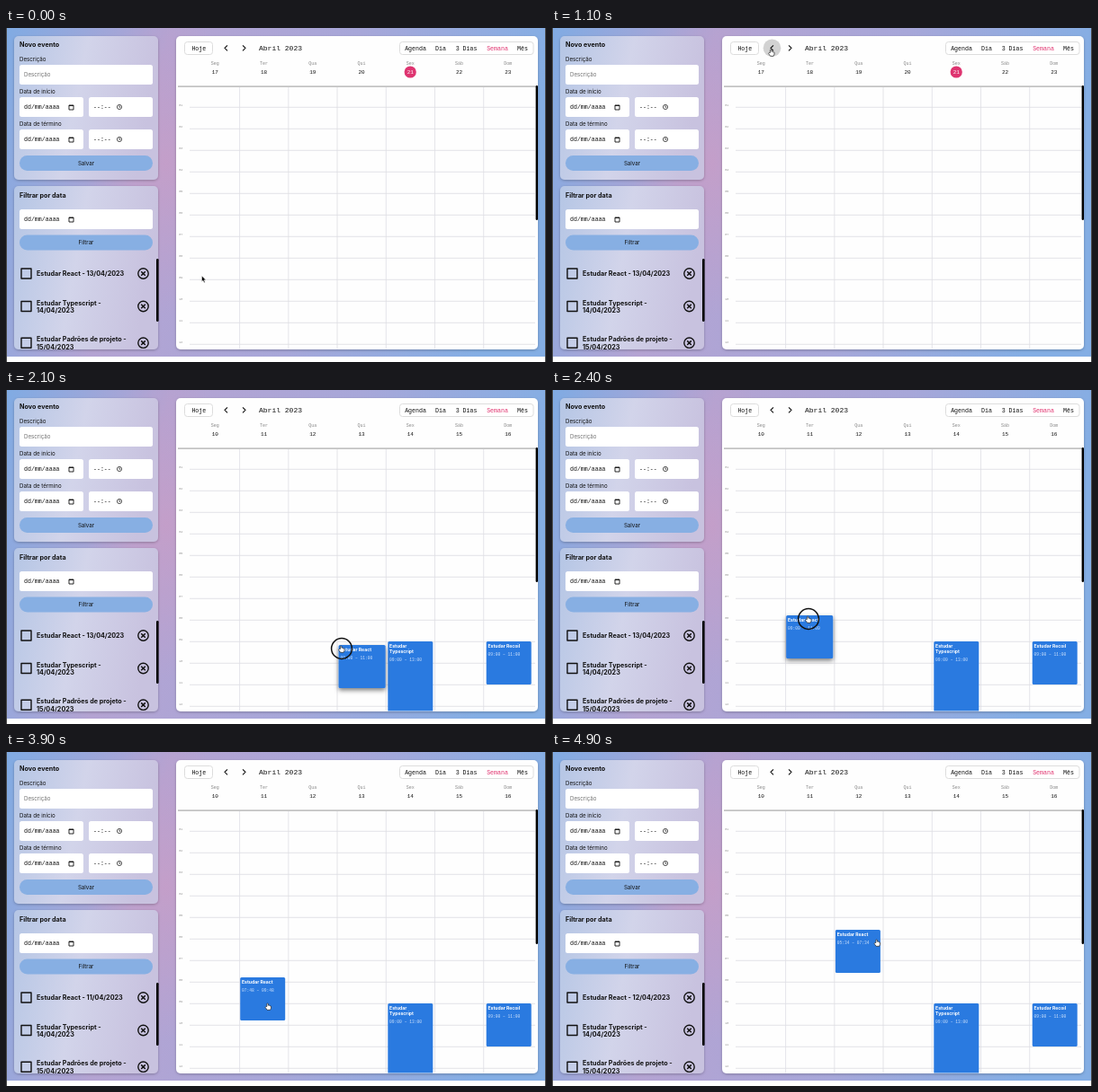
Recreate the animation shown at these times as an HTML page. Size 600x372 px, loop 5000 ms.

```html
<!DOCTYPE html>
<html lang="pt">
<head>
<meta charset="utf-8">
<style>
html, body { margin: 0; width: 100%; height: 100%; overflow: hidden; background: #fff }
svg { display: block; width: 600px; height: 372px }
text { font: 6.2px Inter, sans-serif; fill: #111; white-space: pre }
.b { font-weight: 700; font-size: 7.2px }
.m { font: 6.6px "Liberation Mono", "Courier New", monospace }
.mid { text-anchor: middle }
.day { font-size: 5px; fill: #888 }
.num { font-size: 6px }
.hour { font-size: 3.2px; fill: #888 }
.title { font-size: 5.1px; font-weight: 700; fill: #fff }
.time { font-size: 4.6px; fill: #cfe2fb }
.line { fill: none; stroke: #111 }
</style>
</head>
<body>
<svg id="stage" viewBox="0 0 600 372">
  <defs>
    <linearGradient id="sky" x2="1" y2=".15">
      <stop stop-color="#80abe3"/><stop offset=".3" stop-color="#b4a3d2"/>
      <stop offset=".65" stop-color="#a7a7d9"/><stop offset="1" stop-color="#84aee4"/>
    </linearGradient>
    <radialGradient id="pink">
      <stop stop-color="#c99dc6" stop-opacity=".75"/><stop offset="1" stop-color="#c99dc6" stop-opacity="0"/>
    </radialGradient>
    <linearGradient id="glass" x2="1" y2=".2">
      <stop stop-color="#b5c6e5"/><stop offset=".5" stop-color="#d2d4ea"/><stop offset="1" stop-color="#c8c2df"/>
    </linearGradient>
    <filter id="soft" x="-20%" y="-20%" width="140%" height="150%">
      <feDropShadow dx="0" dy="1" stdDeviation="1.5" flood-opacity=".25"/>
    </filter>
    <filter id="lift" x="-20%" y="-20%" width="140%" height="150%">
      <feDropShadow dx="0" dy="2.5" stdDeviation="2.5" flood-opacity=".5"/>
    </filter>
    <clipPath id="list"><rect x="9" y="257" width="160" height="101"/></clipPath>
    <clipPath id="grid"><rect x="189" y="66" width="400" height="291.5"/></clipPath>
  </defs>
</svg>
<script>
const stage = document.getElementById('stage');
const $ = id => document.getElementById(id);
const times = (n, f) => Array.from({length: n}, (_, i) => f(i)).join('');
const rect = (x, y, w, h, fill, r = 0, more = '') =>
  `<rect x="${x}" y="${y}" width="${w}" height="${h}" rx="${r}" fill="${fill}" ${more}/>`;
const text = (x, y, str, cls = '', more = '') => `<text x="${x}" y="${y}" class="${cls}" ${more}>${str}</text>`;
const path = (d, more = '') => `<path d="${d}" class="line" ${more}/>`;

const dateBox = (y, w = 71) => rect(15, y, w, 22, '#fff', 2.5) + text(20, y + 13.2, 'dd/mm/aaaa', 'm') +
  path(`M70 ${y + 9}h5v5h-5zM70 ${y + 9.5}h5`, 'stroke-width=".9"');
const timeBox = y => rect(92, y, 71, 22, '#fff', 2.5) + text(97, y + 13.2, '--:--', 'm') +
  path(`M123.4 ${y + 11}a2.6 2.6 0 1 0 5.2 0a2.6 2.6 0 1 0 -5.2 0M126 ${y + 9.3}v1.9h1.3`, 'stroke-width=".7"');
const button = (y, label) => rect(15, y, 148, 17, '#87afe3', 8.5) + text(89, y + 10.6, label, 'mid');
const task = (y, first, second) =>
  path(`M17 ${y - 5.5}h11v11h-11z`, 'stroke-width="1.4" stroke-linejoin="round"') +
  `<circle cx="152.5" cy="${y}" r="5.7" class="line" stroke-width="1.4"/>` +
  path(`M150.2 ${y - 2.3}l4.6 4.6m0 -4.6l-4.6 4.6`, 'stroke-width="1.5"') +
  (second ? text(34, y - 1.5, first, 'b') + text(34, y + 7.2, second, 'b') : text(34, y + 2.6, first, 'b', 'id="task"'));

const colX = i => 205.5 + 54.7 * i;
const dayX = i => 232.3 + 54.25 * i;
const card = (x, y, h, lines, span, id = '') => `<g transform="translate(${x} ${y})" ${id && `id="${id}"`}>` +
  rect(0, 0, 50, h, '#2a7ae0', 1.5) +
  lines.map((s, i) => text(1.8, 7.2 + 6 * i, s, 'title')).join('') +
  text(1.8, 10 + 6 * lines.length, span, 'm time') + '</g>';

const sidebar =
  rect(9, 9, 160, 160, 'url(#glass)', 5, 'filter="url(#soft)"') +
  text(15, 21.3, 'Novo evento', 'b') +
  text(15, 36.7, 'Descrição') + rect(15, 41, 148, 22, '#fff', 2.5) +
  text(20, 54.2, 'Descrição', '', 'fill-opacity=".6"') +
  text(15, 72.7, 'Data de início') + dateBox(77) + timeBox(77) +
  text(15, 108.7, 'Data de término') + dateBox(113) + timeBox(113) + button(142, 'Salvar') +
  rect(9, 176, 160, 182, 'url(#glass)', 5, 'filter="url(#soft)"') +
  text(15, 189.3, 'Filtrar por data', 'b') + dateBox(202, 148) + button(230.5, 'Filtrar') +
  '<g clip-path="url(#list)">' + task(273.5, ' ') +
  task(310, 'Estudar Typescript -', '14/04/2023') +
  task(350.7, 'Estudar Padrões de projeto -', '15/04/2023') + '</g>' +
  rect(167, 257, 2.6, 70, '#000', 1.2);

const views = [['Agenda', 455], ['Dia', 483], ['3 Dias', 511.5], ['Semana', 546], ['Mês', 574]];
const calendar =
  rect(189, 9, 402, 349, '#fefefe', 5, 'filter="url(#soft)"') +
  rect(198.5, 15.5, 31, 14, '#fff', 3, 'stroke="#ddd"') + text(214.3, 24.7, 'Hoje', 'm mid') +
  '<circle id="hover" cx="244.5" cy="22.3" r="9.8" fill="#d2d2d2"/>' +
  path('M246 19.3l-3 3l3 3M263 19.3l3 3l-3 3', 'stroke-width="1.1"') +
  text(281, 25.2, 'Abril 2023', 'm b', 'style="font-size:8px"') +
  rect(437.5, 15.5, 148.5, 14, '#fff', 3, 'stroke="#ddd"') +
  views.map(([s, x]) => text(x, 24.7, s, 'm mid', s == 'Semana' ? 'style="fill:#e0336f"' : '')).join('') +
  '<circle id="today" cx="449.2" cy="49" r="6.6" fill="#de3470"/>' +
  ['Seg', 'Ter', 'Qua', 'Qui', 'Sex', 'Sáb', 'Dom'].map((s, i) =>
    text(dayX(i), 41.3, s, 'm mid day') + text(dayX(i), 51.2, '', 'm mid num', `id="day${i}"`)).join('') +
  '<g clip-path="url(#grid)">' +
  times(12, i => path(`M204 ${88.3 + 24 * i}h384`, 'style="stroke:#dedee4" stroke-width=".8"') +
    text(192.3, 87.3 + 24 * i, String(i + 1).padStart(2, 0), 'm hour')) +
  times(6, i => path(`M${259.6 + 54.22 * i} 66v292`, 'style="stroke:#dedee4" stroke-width=".8"')) +
  '<g id="events">' +
  card(colX(4), 280, 96, ['Estudar', 'Typescript'], '09:00 – 13:00') +
  card(colX(6), 280, 48, ['Estudar Recoil'], '09:00 – 11:00') +
  card(0, 0, 48, ['Estudar React'], ' ', 'react') + '</g></g>' +
  rect(191, 64.5, 398, 1.2, '#aaa') + rect(588.6, 64, 2.4, 150, '#000', 1.2);

const pointers =
  '<circle id="ring" r="11.4" class="line" stroke-width="1.5"/>' +
  '<path id="arrow" d="M0 0v6.6l1.5 -1.4l1.1 2.5l1.1 -.5l-1.1 -2.4h2.1z" fill="#000" stroke="#fff" stroke-width=".5"/>' +
  '<path id="hand" d="M-1.6 .5v-3a.8 .8 0 0 1 1.5 0v1.7q1.2 -.4 1.6 .5q1.6 -.2 1.6 1.2q0 2.2 -1 3.4h-3.5q-1.2 -1.7 -2 -3q.6 -1.4 1.8 -.8z" fill="#fff" stroke="#222" stroke-width=".7"/>';

stage.innerHTML += rect(0, 0, 600, 366, 'url(#sky)') +
  '<ellipse cx="178" cy="150" rx="90" ry="170" fill="url(#pink)"/>' +
  rect(0, 0, 1, 372, '#444') + rect(599, 0, 1, 372, '#444') +
  sidebar + calendar + `<g id="cursor">${pointers}</g>`;

// Pointer path: time, x, y
const route = [
  [0, 217.5, 276], [200, 217.5, 276], [900, 244, 27], [1300, 244, 27], [1900, 372, 284], [2000, 372, 284],
  [2100, 373, 288], [2400, 285, 255], [2600, 285, 255], [2900, 308, 272], [3400, 308, 272],
  [3900, 291.5, 283], [4100, 303, 259], [4300, 358, 211], [4500, 361, 206], [4600, 361, 206], [4900, 361.5, 212]
];
function pointerAt(t) {
  const i = Math.max(1, route.findIndex(k => k[0] >= t));
  const [a, b] = [route[i - 1], route[i]];
  const p = (t - a[0]) / (b[0] - a[0]), e = p * p * (3 - 2 * p);
  return [a[1] + (b[1] - a[1]) * e, a[2] + (b[2] - a[2]) * e];
}

const show = (id, on) => $(id).style.display = on ? '' : 'none';

function draw(t) {
  const [x, y] = pointerAt(t);
  const opened = t >= 1300;
  const drag = t >= 2000 && t < 2600 ? 4 : t >= 4100 && t < 4600 ? 8 : 0;
  const moves = (t >= 2600) + (t >= 4600);
  const col = drag ? Math.floor((x - 205.4) / 54.22) : [3, 1, 2][moves];
  const top = drag ? y - drag : [280, 251, 198][moves];

  $('cursor').setAttribute('transform', `translate(${x} ${y})`);
  const onCard = t >= 1900, onButton = t >= 800 && t < 1400;
  show('hand', onCard || onButton);
  show('arrow', !onCard && !onButton);
  show('ring', drag || t == 1200);
  show('hover', onButton);
  show('today', !opened);
  show('events', opened);
  for (let i = 0; i < 7; i++) {
    $('day' + i).textContent = (opened ? 10 : 17) + i;
    $('day' + i).style.fill = !opened && i == 4 ? '#fff' : '';
  }
  $('task').textContent = `Estudar React - ${[13, 11, 12][moves]}/04/2023`;

  const react = $('react');
  react.setAttribute('transform', `translate(${colX(col)} ${top})`);
  react.setAttribute('filter', drag ? 'url(#lift)' : 'none');
  react.firstChild.setAttribute('width', drag ? 52 : 50);
  react.lastChild.textContent = ['09:00 – 11:00', '07:48 – 09:48', '05:34 – 07:34'][moves];
}

const start = performance.now();
function tick() {
  draw(Math.floor((performance.now() - start) % 5000 / 100) * 100);
  requestAnimationFrame(tick);
}
tick();
</script>
</body>
</html>
```
